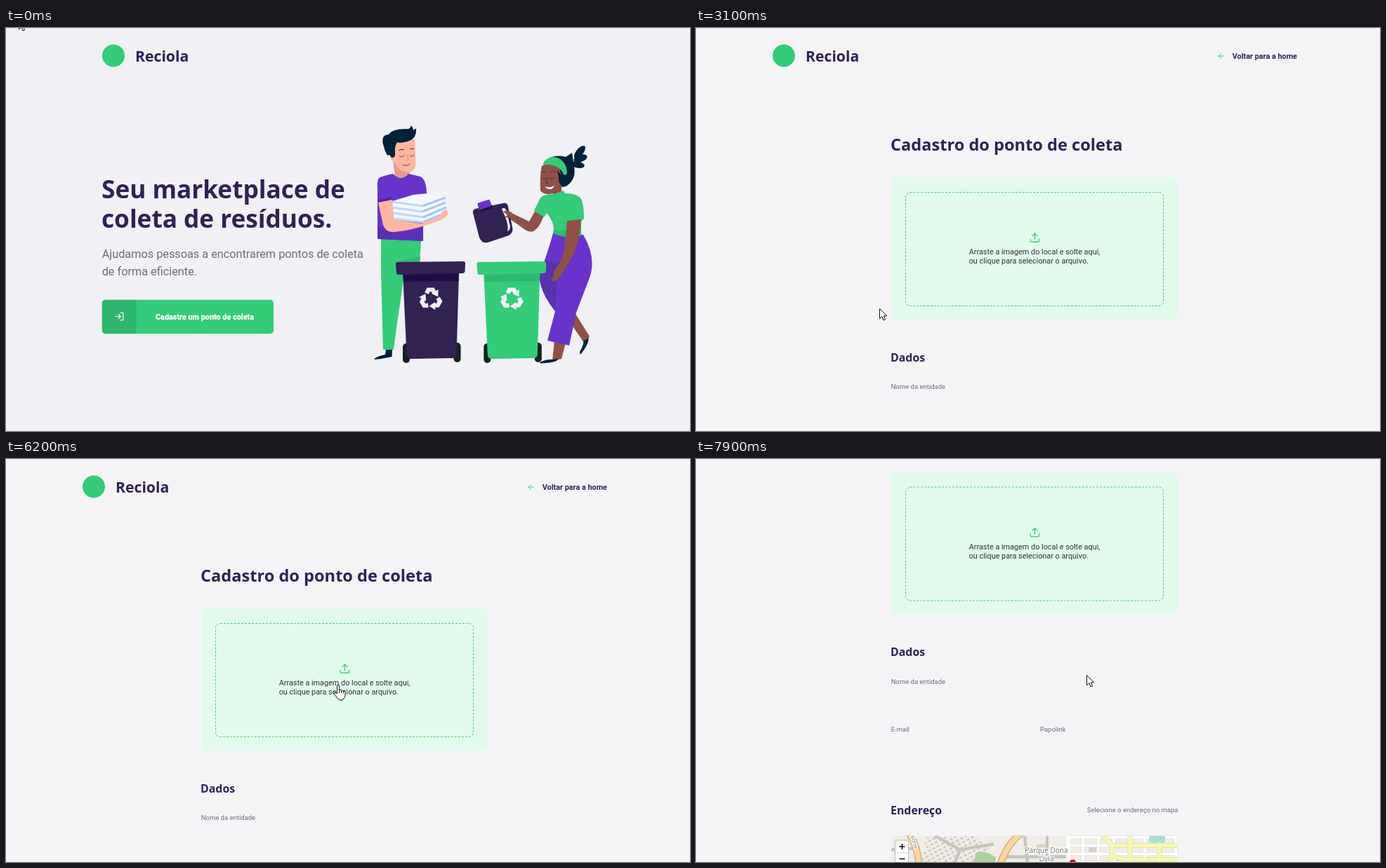
Animation of 974 by 575 pixels, one loop 8 s. Source, as an HTML page:

```html
<!DOCTYPE html>
<html lang="pt-BR">
<head>
<meta charset="utf-8">
<title>Reciola</title>
<style>
html, body { margin: 0; height: 100%; overflow: hidden; background: #f0f0f5; }
svg { display: block; }
text { font: 10.85px Roboto, sans-serif; fill: #333; white-space: pre; }
.h { font-family: "Open Sans", "Noto Sans", sans-serif; font-weight: 700; fill: #322153; }
.brand { font-size: 21.2px; }
.h1 { font-size: 35.2px; }
.h2 { font-size: 23.6px; }
.h3 { font-size: 15.9px; }
.lead { font-size: 16.27px; fill: #6c6c80; }
.label { font-size: 9.5px; fill: #6c6c80; }
.bold { font-weight: 700; }
.icon { fill: none; stroke-width: 2; stroke-linecap: round; stroke-linejoin: round; }
.ink { fill: var(--ink); }
.skin { fill: #ffb6a0; }
.brown { fill: #8f5148; }
.violet { fill: #6833cb; }
.green { fill: #34cb79; }
.plum { fill: #322153; }
.fine { fill: none; stroke: #4a2430; stroke-width: .8; stroke-linecap: round; }
.place { font: 10px "Noto Sans", sans-serif; fill: #777; stroke: #fff; stroke-width: 2.5; paint-order: stroke; text-anchor: middle; }
</style>
</head>
<body>
<svg id="stage" width="974" height="575" viewBox="0 0 974 575">
<defs>
  <g id="third">
    <path d="M-5.500-7L-3-11.500H2.500L4.500-8.500" fill="none" stroke="#f0f0f5" stroke-width="5.400"/>
    <path d="M.8-6.600L9.400-11.800L9-2.600Z" fill="#f0f0f5"/>
  </g>
  <g id="bin">
    <rect x="565" y="450" width="10" height="28" rx="5" fill="#10231f"/>
    <rect x="637.500" y="449" width="10" height="28" rx="5" fill="#10231f"/>
    <path d="M565 349H645L641.500 466Q641 471 636 471L577 472Q571 472 570.500 466Z" fill="currentColor"/>
    <path d="M565.500 350H645L644.700 361L566 362Z" fill="var(--strip)"/>
    <path d="M558 334L651 333Q654 333 654 336L653.500 347Q653 350 650 350L559 352Q556 352 556 349L555 337Q555 334 558 334Z" fill="currentColor"/>
    <g transform="translate(605 386.500) scale(1.13)">
      <use href="#third"/><use href="#third" transform="rotate(120)"/><use href="#third" transform="rotate(240)"/>
    </g>
  </g>
  <clipPath id="mapClip"><rect width="408" height="240" rx="6"/></clipPath>
  <pattern id="lots" width="7" height="6" patternUnits="userSpaceOnUse" patternTransform="rotate(-28)">
    <rect x="1" y="1" width="4" height="2.500" fill="#cbc6bd"/>
  </pattern>
</defs>

<g id="home">
  <rect width="974" height="575" fill="#f0f0f5"/>
  <circle cx="153" cy="39.500" r="16" class="green"/>
  <text class="h brand" x="184" y="48">Reciola</text>
  <text class="h h1" x="136" y="242.700">Seu marketplace de</text>
  <text class="h h1" x="136" y="285.300">coleta de resíduos.</text>
  <text class="lead" x="136.700" y="328">Ajudamos pessoas a encontrarem pontos de coleta</text>
  <text class="lead" x="136.700" y="353">de forma eficiente.</text>
  <rect id="button" x="136.700" y="387.700" width="244.300" height="48.600" rx="5"/>
  <path d="M185.500 387.700V436.300H142Q136.700 436.300 136.700 431V393Q136.700 387.700 142 387.700Z" fill="#000" opacity=".1"/>
  <g class="icon" stroke="#fff" transform="translate(154.300 404.300) scale(.6)">
    <path d="M15 3h4a2 2 0 0 1 2 2v14a2 2 0 0 1-2 2h-4M10 17l5-5-5-5M15 12H3"/>
  </g>
  <text class="bold" x="213" y="415.700" style="fill:#fff;stroke:#fff;stroke-width:.3">Cadastre um ponto de coleta</text>

  <!-- man -->
  <path class="green" d="M534 301L591 303L589 336L567 349Q562 390 557 420L552 459H537L534 350Z"/>
  <path d="M560 332L590 326L589 336H560Z" fill="#2fb870"/>
  <path class="ink" d="M541 459H550L549.500 469Q537 472 524 473Q526 469 540 466Z"/>
  <path d="M551 188L554 212Q566 222 573 213L576 203Z" fill="#e79a8b"/>
  <path class="violet" d="M551 208Q536 211 531 214Q528 218 529 232L529 301L594 304L594 260L599 238Q599 216 590 212L573 208Q563 220 551 208Z"/>
  <path d="M529 282Q555 302 594 282V304L529 301Z" fill="#5b30b4"/>
  <path d="M530 245L550 241V247L531 250Z" fill="#5229a5"/>
  <path class="skin" d="M547 173Q555 156 582 159L583.500 191Q583 206 573 206Q559 206 553 191Q546 189 547 179Z"/>
  <path class="ink" d="M537 166Q534 152 545 152Q550 143 573 144Q577 142 576 139Q580 141 580 146L584 143Q585 157 574 161Q562 165 557 163Q553 169 554 177Q555 186 549 185Q546 179 543 182Q539 175 537 166Z"/>
  <path class="fine" d="M560 182Q563 186 567 182M575 182Q578 185 581 181M565 195Q570 198 575 194"/>
  <path class="fine" d="M571 181L573 188L570 189" style="stroke:#d98a78"/>
  <path class="ink" d="M558 175Q563 171.500 568 174Q562 173.500 558 175ZM574 173Q578 170.500 582 173Q578 172.500 574 173Z"/>
  <path d="M550 247L580 238L600 236L627 241L628 262L594 278L551 274Z" fill="#f3f7ff"/>
  <g fill="none" stroke-width="3">
    <path d="M550 248L593 254M550 256L593 262M551 264L594 270M552 272L594 277" stroke="#c3d7f7"/>
    <path d="M593 254L626 242M593 262L626 249M594 270L627 256M594 277L623 265" stroke="#a9c6ec"/>
  </g>
  <path class="skin" d="M530 249L550 245Q551 262 553 274L592 279L618 269Q620 261 626 259Q629 259 629 266Q626 271 619 274Q585 288 553 291Q541 292 537 281Z"/>

  <!-- woman -->
  <path class="brown" d="M811 408L831 440L823 449L806 424Z"/>
  <path class="ink" d="M829 441Q832 448 818 466L817 462Q822 454 823 445Q826 447 829 441Z"/>
  <path class="brown" d="M781 445L797 449L791 472L778 475Z"/>
  <path class="ink" d="M760 477Q770 472 780 473L787 471L784 475Q771 479 760 478Z"/>
  <path class="violet" d="M779 293L822 295Q842 329 830 359Q820 385 812 406L802 453L771 446L782 404Q758 374 760 350Q770 325 779 293Z"/>
  <path d="M768 331Q782 339 795 330Q782 356 783 374L782 404Q758 374 760 350Z" fill="#5930ae"/>
  <g class="ink">
    <ellipse cx="817" cy="177" rx="11" ry="5" transform="rotate(-50 817 177)"/>
    <ellipse cx="818" cy="186" rx="10" ry="5" transform="rotate(-18 818 186)"/>
    <ellipse cx="814" cy="195" rx="10" ry="4.500" transform="rotate(12 814 195)"/>
    <path d="M766 191Q779 179 797 184L806 178L809 198Q812 215 800 224Q795 229 786 225Z"/>
  </g>
  <path class="brown" d="M763 197Q773 190 786 195Q792 206 791 235L784 240Q779 240 779 236Q766 239 761 232Q760 210 763 197Z"/>
  <path class="ink" d="M785 203Q794 211 792 226Q786 221 787 213Z"/>
  <path class="green" d="M764 195Q771 181 785 185Q798 190 799 207Q797 211 794 209Q787 193 764 195Z"/>
  <path d="M767 226Q774 229 781 225Q776 235 767 226Z" fill="#fff"/>
  <path class="fine" d="M763 214Q766 217 769 214M774 214Q778 217 782 213M771 213L769 221L772 222M762 206Q765 204 768 206M774 206Q779 203 783 206"/>
  <path class="brown" d="M755 258L766 267Q760 285 751 290Q745 292 738 287L717 272L709 270Q706 262 712 260L722 265L745 276Z"/>
  <path class="green" d="M780 237L794 232L796 236Q814 236 819 244Q823 252 823 272L819 276V296Q800 302 779 293Q783 280 770 264L766 270L752 261L760 244Q764 237 780 237Z"/>
  <path d="M780 287Q799 295 819 278V296Q800 302 779 293Z" fill="#2fb870"/>
  <path class="brown" d="M799 275L819 273Q815 319 799 338L789 356Q780 364 777 361L781 345Q792 334 795 315Z"/>

  <!-- jug -->
  <path class="plum" d="M665 264Q664 260 668 258L708 250Q714 249 715 255L721 284Q723 292 716 296L686 306Q678 308 674 299Z"/>
  <path d="M706 258Q711 255 713 262L718 283Q718 288 714 290Q716 282 711 270Z" fill="#f0f0f5"/>
  <path d="M674 256L691 251L693 257L676 262Z" fill="#21113f"/>
  <rect class="violet" x="672" y="247" width="18.500" height="10" rx="2" transform="rotate(-18 681 252)"/>
  <path class="brown" d="M708 262Q714 258 721 264L718 271L710 270L714 267Z"/>

  <use href="#bin" style="color:#322153;--strip:var(--shade)"/>
  <use href="#bin" x="115.300" style="color:#34cb79;--strip:#2fb870"/>
</g>

<g id="form">
  <rect width="974" height="575" fill="#f4f4f7"/>
  <g id="page">
    <circle cx="125" cy="39.500" r="16" class="green"/>
    <text class="h brand" x="156" y="48">Reciola</text>
    <path class="icon" d="M19 12H5M12 19l-7-7 7-7" stroke="#34cb79" transform="translate(741.500 34) scale(.5)"/>
    <text class="bold" x="763.700" y="43.700" style="fill:#322153">Voltar para a home</text>
    <text class="h h2" x="277" y="174.800">Cadastro do ponto de coleta</text>
    <rect x="278" y="213" width="408.500" height="203" rx="7" fill="#e1faec"/>
    <rect x="298.500" y="234.500" width="367" height="162" rx="6.500" fill="none" stroke="#4ecb79" stroke-dasharray="3 2"/>
    <path class="icon" d="M21 15v4a2 2 0 0 1-2 2H5a2 2 0 0 1-2-2v-4M17 8l-5-5-5 5M12 3v12" stroke="#4ecb79" transform="translate(474.200 291) scale(.68)"/>
    <text x="388.700" y="323.300">Arraste a imagem do local e solte aqui,</text>
    <text x="388.700" y="336">ou clique para selecionar o arquivo.</text>
    <text class="h h3" x="277" y="475.500">Dados</text>
    <text class="label" x="277.700" y="515">Nome da entidade</text>
    <text class="label" x="277.700" y="583">E-mail</text>
    <text class="label" x="490" y="583">Papolink</text>
    <text class="h h3" x="277" y="701">Endereço</text>
    <text class="label" x="686.500" y="698" text-anchor="end">Selecione o endereço no mapa</text>

    <g transform="translate(278 732)"><g clip-path="url(#mapClip)">
      <rect width="408" height="240" fill="#f0ede6"/>
      <path d="M50 2L118 0L140 18L116 60H40Z" fill="url(#lots)"/>
      <path d="M121 24Q135 20 149 31L146 60H112Z" fill="#aed1a0"/>
      <path d="M208 12H223V24H205ZM282 15H292V28H280Z" fill="#d9d0c9"/>
      <g fill="none">
        <path id="lanes" d="M62 0L98 20L146 12M98 20L82 60M190 0L196 60M0 20L36 18M160 30H252M222 0V60" stroke="#c8c4be" stroke-width="4"/>
        <use href="#lanes" style="stroke:#fff;stroke-width:3"/>
        <path id="grid" stroke="#d6d2ca" stroke-width="5"/>
        <path id="gridFill" stroke="#fff" stroke-width="4"/>
        <path id="avenues" d="M300 0Q318 10 314 26Q320 34 340 34H408M314 26L306 60M382 0V60M340 0V60M314 14H408" stroke="#d2d68c" stroke-width="6.500"/>
        <path d="M300 0Q318 10 314 26Q320 34 340 34H408M314 26L306 60M382 0V60M340 0V60M314 14H408" stroke="#f4f8b4" stroke-width="5.500"/>
        <path d="M252 0V60" stroke="#fff" stroke-width="5"/>
        <path d="M25-4Q41 18 40 60M186-4Q160 14 150 60" stroke="#c99a55" stroke-width="10"/>
        <path d="M25-4Q41 18 40 60M186-4Q160 14 150 60" stroke="#fbd5a2" stroke-width="8"/>
      </g>
      <rect x="367" y="0" width="23" height="10" rx="2" fill="#a9dfcb"/>
      <text class="place" x="221" y="24">Parque Dona</text>
      <text class="place" x="221" y="36">Lívia</text>
      <text class="place" transform="translate(30 9) rotate(74)" style="font-size:8px">Norte</text>
      <circle cx="258.500" cy="39" r="5" fill="#d40b18"/>
      <rect x="5.500" y="6.500" width="19" height="36" rx="2.500" fill="#fff" stroke="#bbb"/>
      <path d="M6 24.500H24" stroke="#ccc"/>
      <path d="M11.500 15.500H19.500M15.500 11.500V19.500M11.500 33H19.500" stroke="#000" stroke-width="1.600"/>
    </g></g>
  </g>
</g>

<g id="status"><path d="M0 567.500H11Q14 567.500 14 571V575H0Z" fill="#35363a"/><path d="M3 574H8" stroke="#9a9ba0"/></g>
<g id="cursor" fill="#fff" stroke="#111" stroke-linejoin="round">
  <path id="arrow" d="M.5.500V14.800L4 11.700L6.100 17L8.500 16L6.300 10.800H10.700Z"/>
  <g id="hand" transform="translate(-6)">
    <path d="M4.500 13V2Q4.500.500 6 .500T7.500 2V8Q10.500 6 10.500 8.700Q13.300 7 13.300 9.700Q16 8.500 16 11.500V15Q16 18 14 20Q13 22 10 22Q7 22 5.500 20L.9 14Q0 11.500 2 11.300Q3.500 11.500 4.500 13Z"/>
    <path d="M7.500 8V12M10.500 8.700V12M13.300 9.700V12.500" fill="none"/>
  </g>
</g>
</svg>
<script>
const $ = id => document.getElementById(id);
const LOOP = 8000;

// pointer tip: time, x, y
const track = [
  [100, 18, -13], [1000, 173, 197], [1200, 173, 197], [1700, 256, 396], [1900, 267, 412],
  [2200, 267, 412], [2300, 267, 407], [2900, 267, 407], [3100, 261, 400], [3200, 261, 400],
  [3500, 277, 396], [3700, 272, 393], [4300, 272, 393], [4400, 285, 392], [4500, 285, 392],
  [5100, 384, 360], [5400, 426, 338], [5500, 435, 334], [5600, 435, 334], [6200, 473, 322],
  [6500, 482, 322], [6700, 483, 322], [6900, 492, 321], [7400, 492, 321], [7900, 556, 308]
];

function pointer(t) {
  const i = track.findIndex(k => k[0] >= t);
  if (i < 1) return track[0].slice(1);
  const [t0, x0, y0] = track[i - 1], [t1, x1, y1] = track[i];
  const p = (t - t0) / (t1 - t0);
  return [x0 + (x1 - x0) * p, y0 + (y1 - y0) * p];
}

let streets = "";
for (let x = 273; x < 410; x += 22) streets += `M${x} 0V60`;
for (let y = 2; y < 60; y += 12) streets += `M252 ${y}H408`;
for (const id of ["grid", "gridFill"]) $(id).setAttribute("d", streets);

const show = (id, on) => $(id).style.display = on ? "" : "none";

function draw() {
  const t = Math.floor(performance.now() % LOOP / 100) * 100;
  const home = t < 2300;
  const scroll = t < 7400 ? 0 : 12 + (t - 7400) / 500 * 182.5;
  const [x, y] = pointer(t);
  const hover = home && y > 388;
  const hand = home ? hover : t < 3000 || t >= 4400 && 416 - scroll > y;

  show("home", home);
  show("form", !home);
  show("arrow", !hand);
  show("hand", hand);
  $("button").style.fill = hover ? "#2fb86e" : "#34cb79";
  $("stage").style.setProperty("--ink", t < 1300 ? "#03213a" : "#0b193b");
  $("stage").style.setProperty("--shade", t < 1300 ? "#210d43" : "#0b1a3c");
  $("page").setAttribute("transform", `translate(0 ${-scroll})`);
  $("cursor").setAttribute("transform", `translate(${Math.round(x)} ${Math.round(y)})`);
  $("status").style.opacity = t < 2100 || t >= 2800 ? 0 : t < 2700 ? 1 : 0.5;
  requestAnimationFrame(draw);
}
draw();
</script>
</body>
</html>
```
